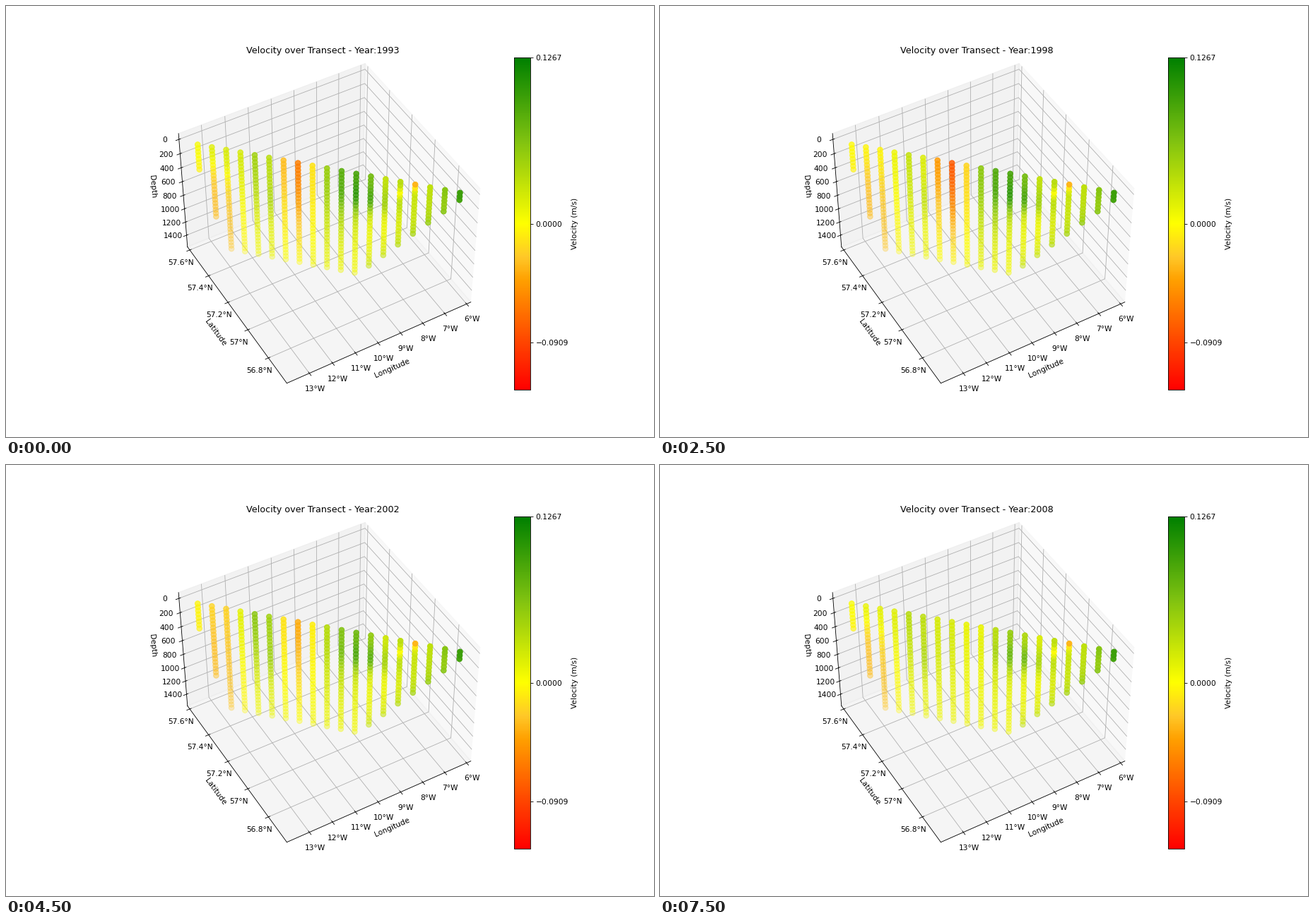
A matplotlib script for the animation above (8 s loop, 917 px wide and 611 px high).

```python
import numpy as np
import matplotlib.pyplot as plt
from matplotlib.animation import FuncAnimation
from matplotlib.colors import LinearSegmentedColormap

W, H = 917, 611
DPI = W / 12
VMAX, VMIN = 0.1267, -0.0909
FIRST, YEARS = 1993, 16

# Stations along a straight section, 50 m levels down to the sea bed
COLS = 19
LON = np.linspace(-13.444, -6.324, COLS)
LAT = np.linspace(57.561, 56.689, COLS)
station = np.arange(COLS)
levels = np.minimum(30, np.minimum(8 + 13 * station, 75 - 4 * station))
col = np.repeat(station, levels)
lev = np.concatenate([np.arange(n) for n in levels])
depth = 25 + 50 * lev
above_bed = levels[col] - 1 - lev

# Strength of each current at key years, as a share of VMAX
KEY_YEARS = [1993, 1996, 1998, 2000, 2002, 2004, 2008]
FLANK = [.15, .10, -.05, -.10, -.20, .10, .10]
RIDGE = [.40, .12, .25, .37, .50, .27, .30]
EDDY = [.50, .17, .65, -.12, .32, .40, -.15]
JET = [.70, .75, .70, .55, .55, .35, .40]


def bump(x, mid, width):
    return np.exp(-((x - mid) / width) ** 2)


def surface(year):
    flank, ridge, eddy, jet = (np.interp(year, KEY_YEARS, k)
                               for k in (FLANK, RIDGE, EDDY, JET))
    v = flank * bump(col, 1.6, 1.2) + ridge * bump(col, 4.4, 1.3)
    v += eddy * (.4 * bump(col, 9.3, .9) - bump(col, 6.8, 1.2))
    v += jet * bump(col, 11, 1.9)
    return v + .22 * np.clip(col - 13, 0, 1) + .45 * bump(col, 18, 1.2)


def velocity(year):
    reach = 3 + 17 * bump(col, 7, 5)
    deep = .05 - .31 * bump(col, 1.4, 1.3) + .06 * np.clip(col - 13, 0, None)
    fade = bump(lev, 0, reach)
    v = surface(year) * fade + deep * (1 - fade)
    v += .36 * bump(col, 12, 1.8) * bump(lev, 6.5, 3.5)
    v += .12 * bump(col, 5, .8) * bump(lev, 12, 5)
    # Thin return flow sinking westwards, and a drift along the bed
    v -= .5 * bump(col + lev / 3.5, 15, .45) * bump(lev, 0, 4)
    v += .18 * (col > 11) * np.exp(-above_bed / 3)
    return np.clip(v * VMAX, VMIN, VMAX)


def padded(lo, hi):
    pad = (hi - lo) * (.05 + 1.1 / 48)
    return lo - pad, hi + pad


cmap = LinearSegmentedColormap.from_list("flow", [
    (0, "red"), (.33, "#ffa000"), (.40, "#ffc828"),
    (.5, "yellow"), (.75, "#80c210"), (1, "green")])

fig = plt.figure(figsize=(12, (H + 1e-6) / DPI), dpi=DPI)
ax = fig.add_subplot(projection="3d")
ax.view_init(elev=45, azim=-120)
dots = ax.scatter(LON[col], LAT[col], -depth, c=velocity(FIRST), s=50,
                  cmap=cmap, vmin=-VMAX, vmax=VMAX)
bar = fig.colorbar(dots, ax=ax, ticks=[VMIN, 0, VMAX])
bar.set_label("Velocity (m/s)")

ax.set_xlim(*padded(LON[0], LON[-1]))
ax.set_ylim(*padded(LAT[-1], LAT[0]))
ax.set_zlim(*padded(-1475, -25))

west = np.arange(13, 5, -1)
north = np.arange(568, 577, 2) / 10
down = np.arange(0, 1401, 200)
ax.set_xticks(-west, [f"{d}°W" for d in west])
ax.set_yticks(north, [f"{d:g}°N" for d in north])
ax.set_zticks(-down, [str(d) for d in down])
ax.set_xlabel("Longitude")
ax.set_ylabel("Latitude")
ax.set_zlabel("Depth")


def update(i):
    year = FIRST + i
    dots.set_array(velocity(year))
    ax.set_title(f"Velocity over Transect - Year:{year}")
    return dots,


anim = FuncAnimation(fig, update, frames=YEARS, interval=500,
                     repeat=True, repeat_delay=0, blit=False)
plt.show()
```
